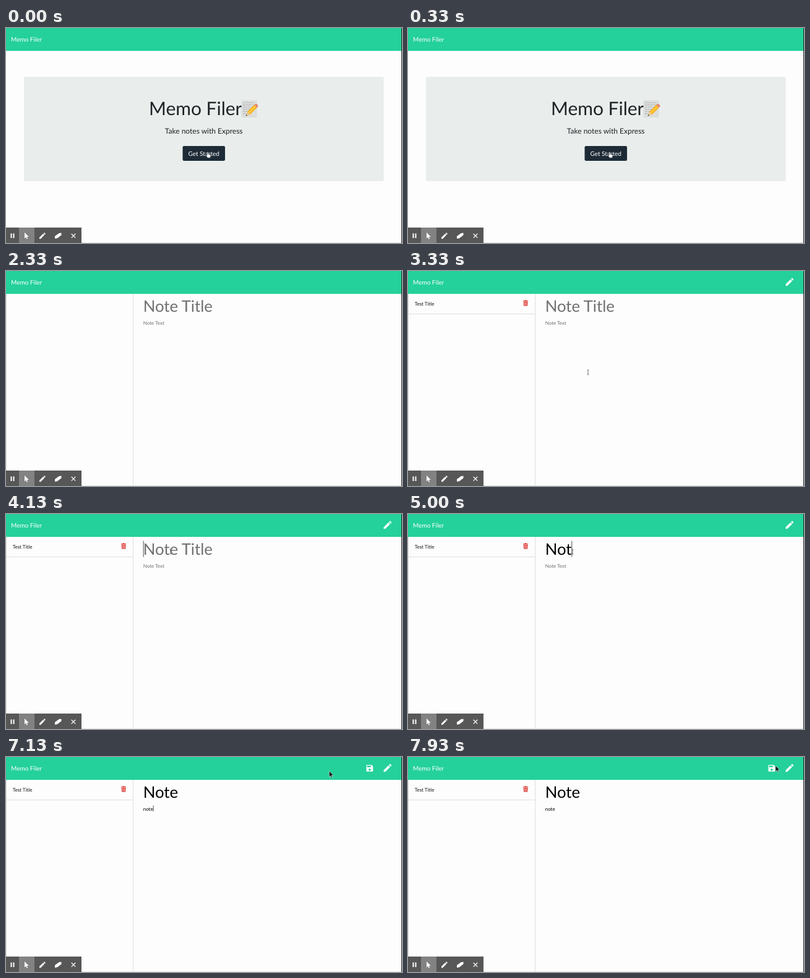
These frames come from a looping animation (640 px wide and 348 px high, 8 s). An HTML page:

```html
<!DOCTYPE html>
<html lang="en">
<head>
<meta charset="utf-8">
<title>Notes demo</title>
<style>
  html, body { margin: 0; width: 100%; height: 100%; overflow: hidden; background: #fdfdfd; }
  svg { display: block; width: 640px; height: 348px; font-family: Lato, sans-serif; text-rendering: geometricPrecision; }
  text { white-space: pre; }
</style>
</head>
<body>
<svg viewBox="0 0 640 348">
  <defs>
    <path id="pencil" d="M3 17.25V21h3.75L17.81 9.94l-3.75-3.75zM20.71 7.04a1 1 0 0 0 0-1.41l-2.34-2.34a1 1 0 0 0-1.41 0l-1.83 1.83 3.75 3.75z"/>
    <path id="arrow" d="M0 0V9.5L2.2 7.5 3.6 10.8 5.1 10.1 3.7 7H6.8Z"/>
  </defs>
  <rect width="640" height="348" fill="#fdfdfd"/>
  <rect width="640" height="37" fill="#24d19a"/>
  <text x="8" y="21.8" font-size="10" fill="#fff">Memo Filer</text>

  <g id="home">
    <rect x="29" y="79" width="581.5" height="169" rx="2" fill="#e9eeec"/>
    <text x="231" y="141" font-size="30" fill="#1f2326">Memo Filer</text>
    <g id="memo">
      <rect x="380.5" y="117" width="25" height="28" fill="#dcdedd"/>
      <path d="M383 121h18M383 124.500h20M383 128h17M383 131.500h13M383 135h9M383 138.500h6" stroke="#a9adac" stroke-dasharray="4 1 2.500 1"/>
      <path d="M387.500 142.500L390 135.500 402 123.500 406.500 128 394.500 140Z" fill="#f6b21b"/>
      <path d="M392.200 137.800L404.200 125.800" stroke="#ffd75e" stroke-width="1.600"/>
      <path d="M387.500 142.500L390 135.500 394.500 140Z" fill="#e9c99b"/>
      <path d="M387.500 142.500l.9-2.600 1.700 1.700Z" fill="#333"/>
      <path d="M401 124.500l2-1.500q2-1 3.500 1t.5 3.500l-1.500 1.500Z" fill="#e58a78"/>
    </g>
    <text x="319.700" y="171.300" font-size="12" fill="#1f2326" text-anchor="middle">Take notes with Express</text>
    <rect x="285.500" y="191" width="68.500" height="24" rx="2.200" fill="#1e2b37"/>
    <text x="319.700" y="206.500" font-size="10" fill="#fff" text-anchor="middle">Get Started</text>
    <path id="hand" d="M325 201q1.200-1.200 2 0v3l3.200.8q1 .4.800 1.600l-.8 3.800h-4.400l-2.600-3.600q.2-1.300 1.800-.4Z" fill="#fff" stroke="#1e2b37" stroke-width=".7"/>
    <circle id="ring" cx="327" cy="204" fill="none" stroke="#e2453c" stroke-width="1.500"/>
    <path id="spark" d="M327.300 200.500q1.800 1.500.8 3.500" fill="none" stroke="#d8574f" stroke-width=".9"/>
  </g>

  <g id="notes">
    <path d="M205.500 37V348M.5 37V348" stroke="#dedede"/>
    <g id="item">
      <path d="M0 69.500H205" stroke="#dedede"/>
      <text x="10.700" y="55.900" font-size="8" fill="#111">Test Title</text>
      <path d="M186 48h2.500l.6-1h2l.6 1h2.500v1.200H186zM186.700 50h6.900l-.4 6.500h-6.100z" fill="#dc3a34"/>
      <path d="M188.500 51v4.500M190.100 51v4.500M191.700 51v4.500" stroke="#fdfdfd" stroke-width=".6"/>
      <use href="#pencil" transform="translate(608.200 9.200) scale(.71)" fill="#fff"/>
    </g>
    <path id="save" transform="translate(580.600 11) scale(.6)" fill="#fff" fill-rule="evenodd"
      d="M17 3H5a2 2 0 0 0-2 2v14a2 2 0 0 0 2 2h14a2 2 0 0 0 2-2V7zM12 19a3 3 0 1 1 0-6 3 3 0 0 1 0 6zM15 9H5V5h10z"/>
    <text id="title" x="221.700" y="65.900" font-size="25.700"/>
    <text id="body" x="221.700" y="86.600" font-size="8"/>
    <rect id="caret" fill="#222" width=".8"/>
    <path id="beam" d="M-1.500-4Q0-4 0-3 0-4 1.500-4M0-3V3M-1.500 4Q0 4 0 3 0 4 1.500 4" fill="none" stroke="#555" stroke-width=".8"/>
    <use id="pointer" href="#arrow" fill="#111" stroke="#fff" stroke-width=".5"/>
  </g>

  <path d="M122 347.500H640" stroke="#e6e6e6"/>
  <path d="M639.500 0V348" stroke="#222"/>

  <g id="toolbar" fill="#fff">
    <rect y="323" width="122" height="25" fill="#575757"/>
    <rect x="21" y="323" width="25" height="25" fill="#828282"/>
    <path d="M7.500 332.500h2v7.500h-2zM11.500 332.500h2v7.500h-2z"/>
    <use href="#arrow" x="30" y="331"/>
    <use href="#pencil" transform="translate(52.300 329.600) scale(.55)"/>
    <path d="M79 337l6.500-4.800 4-.7v3.800l-6.500 5-4 .7z"/>
    <path d="M105.700 333l6.600 6.600M112.300 333l-6.600 6.600" stroke="#fff" stroke-width="1.300"/>
  </g>
</svg>
<script>
const LOOP = 8000;
const el = Object.fromEntries([...document.querySelectorAll('[id]')].map(e => [e.id, e]));
const show = (e, on) => e.setAttribute('visibility', on ? 'inherit' : 'hidden');
const set = (e, attrs) => { for (const k in attrs) e.setAttribute(k, attrs[k]); };
const within = (t, a, b) => t >= a && t < b;

// Times at which each letter is typed
const titleKeys = [4800, 4860, 5000, 5130];
const bodyKeys = [5800, 6000, 6060, 6200];
const typed = (word, keys, t) => word.slice(0, keys.filter(k => t >= k).length);

// Mouse path: time, x, y
const path = [
  [3330, 291, 164], [3400, 290, 160], [3560, 277, 100], [3730, 266, 61], [6600, 266, 61],
  [6800, 330, 54], [7060, 500, 28], [7400, 607, 3], [7530, 607, 3], [7660, 600, 9],
  [7860, 600, 9], [7930, 594, 14], [LOOP, 594, 14]
];

function mouse(t) {
  const i = path.findIndex(p => p[0] > t);
  if (i < 1) return path[0].slice(1);
  const [t0, x0, y0] = path[i - 1], [t1, x1, y1] = path[i];
  const k = (t - t0) / (t1 - t0);
  return [x0 + (x1 - x0) * k, y0 + (y1 - y0) * k];
}

function field(e, text, hint) {
  e.textContent = text || hint;
  e.setAttribute('fill', text ? '#000' : '#707070');
  return text ? 221.7 + e.getComputedTextLength() : 221.7;
}

function draw(t) {
  show(el.home, t < 2330);
  show(el.notes, t >= 2330);

  show(el.hand, t < 1330);
  const k = (t - 1330) / 200;
  show(el.ring, k >= 0 && k < 1);
  if (k >= 0 && k < 1) set(el.ring, { r: 4 + 12 * k, opacity: 0.9 - 0.8 * k });
  show(el.spark, k >= 1);

  show(el.item, t >= 2400);
  show(el.save, t >= 6000);
  const titleEnd = field(el.title, typed('Note', titleKeys, t), 'Note Title');
  const bodyEnd = field(el.body, typed('note', bodyKeys, t), 'Note Text');

  const inTitle = t < 5460;
  set(el.caret, inTitle ? { x: titleEnd, y: 43.5, height: 26 } : { x: bodyEnd, y: 78.5, height: 9.5 });
  show(el.caret, within(t, 4060, 4460) || within(t, 4800, 6600) || within(t, 7060, 7400));

  const [x, y] = mouse(t), inHeader = y < 37;
  const moving = within(t, 3330, 5800) || t >= 6600;
  show(el.beam, moving && !inHeader);
  show(el.pointer, moving && inHeader);
  for (const c of [el.beam, el.pointer]) c.setAttribute('transform', `translate(${x} ${y})`);
}

const start = performance.now();
function frame() {
  draw((performance.now() - start) % LOOP);
  requestAnimationFrame(frame);
}
frame();
</script>
</body>
</html>
```
